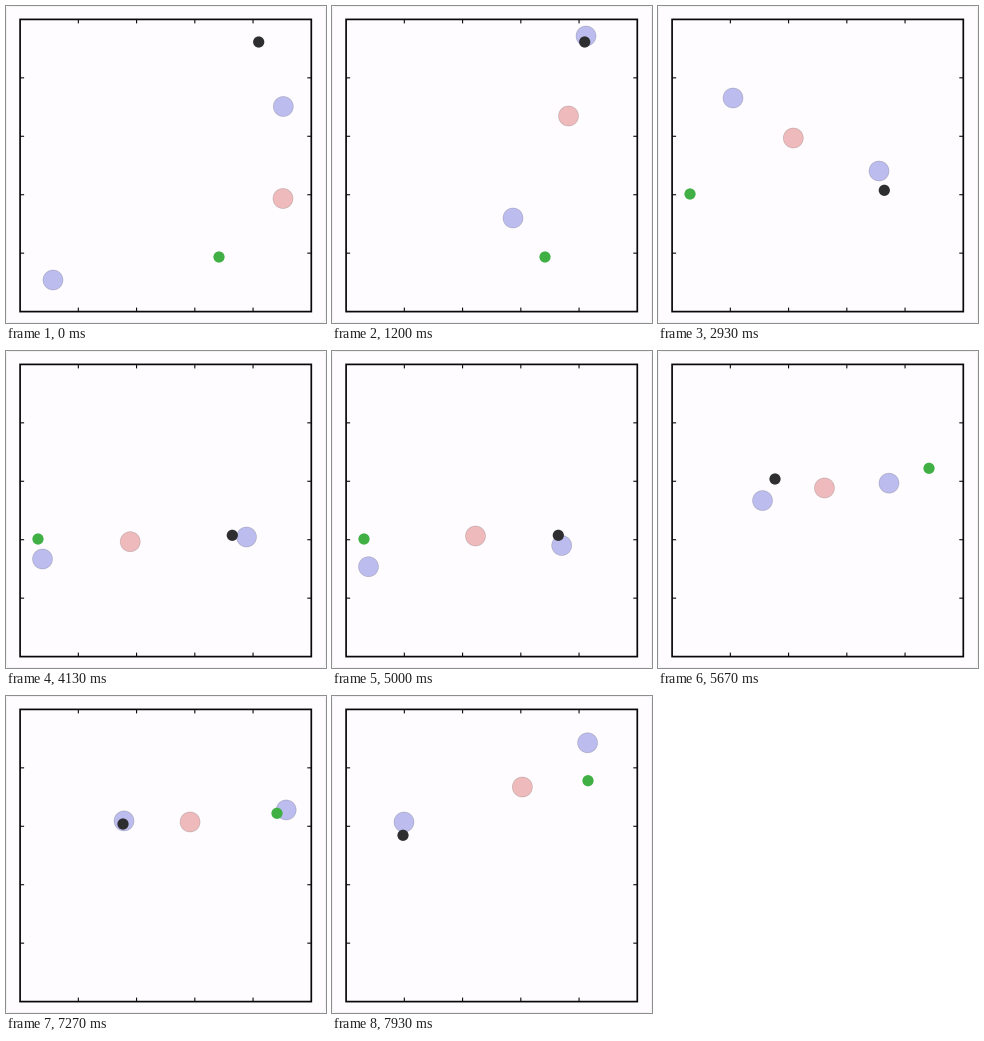
Animation, 320 px wide and 317 px high, one loop 8 s. Source, as a matplotlib script:

```python
import numpy as np
import matplotlib.pyplot as plt
from matplotlib.animation import FuncAnimation
from matplotlib.patches import Circle, FancyBboxPatch, Rectangle

W, H, DPI = 320, 317, 64
PX = 72 / DPI
FRAMES, LOOP = 120, 8000
PAPER, INK = "#fefcfe", "#080808"
BLUE, RED = (0.35, 0.37, 0.85), (0.85, 0.35, 0.35)

# Per episode: landmark places, then the poses (step: chaser, decoy chaser, red)
# that the agents spring between.
EPISODES = [
    dict(goal=(213, 251), decoy=(252.7, 36), poses={
        0: [(47, 274), (277.3, 100.5), (277, 192.5)],
        18: [(181, 212), (254, 30), (236.5, 110)],
        43: [(205, 243), (264, 43), (231, 145)]}),
    dict(goal=(32, 188), decoy=(226.3, 184.3), poses={
        43: [(75, 92), (221, 165), (135.3, 132)],
        61: [(36.5, 208), (240.5, 186), (124.2, 190.7)],
        75: [(36.5, 215.7), (229.7, 194.5), (143.5, 185)]}),
    dict(goal=(271, 117.3), decoy=(117, 128), poses={
        76: [(280.5, 99), (225, 112), (190, 106)],
        97: [(235.7, 129), (116, 146), (168.7, 134)],
        110: [(280, 114), (118, 125), (184, 126)]}),
    dict(goal=(256, 84.7), decoy=(71, 139.3), poses={
        111: [(266, 36), (57, 208), (150, 125)],
        150: [(249.2, 53.4), (81.2, 75.8), (215.1, 70.2)]}),
]


def spring(u):
    """Quick start, slight overshoot, at rest when u reaches 1."""
    return 1 - (1 - u) * np.exp(-2 * u) * np.cos(1.5 * np.pi * u)


def agent_places(poses, step):
    marks = list(poses)
    for a, b in zip(marks, marks[1:]):
        if step <= b:
            break
    p, q = np.array(poses[a]), np.array(poses[b])
    return p + (q - p) * spring((step - a) / (b - a))


fig = plt.figure(figsize=(W / DPI, H / DPI), dpi=DPI, facecolor=PAPER)
ax = fig.add_axes([0, 0, 1, 1])
ax.set(xlim=(0, W), ylim=(H, 0))
ax.axis("off")


def draw_field():
    ax.add_patch(FancyBboxPatch(
        (0.5, 0.5), W - 1, H - 1, boxstyle="round,pad=0,rounding_size=4",
        fc="none", ec="#f2f2f4", lw=PX))
    x0, x1, y0, y1 = 14.1, 305.3, 13.4, 305.6
    ax.add_patch(Rectangle((x0, y0), x1 - x0, y1 - y0, fc="none", ec=INK,
                           lw=1.7 * PX, zorder=3, snap=False))
    style = dict(color=INK, lw=1.1 * PX, zorder=3, snap=False,
                 solid_capstyle="butt")
    for f in np.arange(1, 5) / 5:
        x, y = x0 + f * (x1 - x0), y0 + f * (y1 - y0)
        for edge, d in ((y0, 4), (y1, -4)):
            ax.plot([x, x], [edge, edge + d], **style)
        for edge, d in ((x0, 4), (x1, -4)):
            ax.plot([edge, edge + d], [y, y], **style)


def disc(radius, face, edge="none", z=2):
    return ax.add_patch(Circle((0, 0), radius, fc=face, ec=edge,
                               lw=0.7 * PX, zorder=z))


draw_field()
agents = [disc(10, (*c, 0.4), (0, 0, 0, 0.18)) for c in (BLUE, BLUE, RED)]
goal = disc(5.6, "#40b045", z=4)
decoy = disc(5.6, "#2e2e30", z=4)


def update(step):
    ep = [e for e in EPISODES if min(e["poses"]) <= step][-1]
    goal.center, decoy.center = ep["goal"], ep["decoy"]
    for agent, place in zip(agents, agent_places(ep["poses"], step)):
        agent.center = tuple(place)
    return [*agents, goal, decoy]


anim = FuncAnimation(fig, update, frames=FRAMES, interval=LOOP / FRAMES,
                     repeat=True, repeat_delay=0, blit=False)
plt.show()
```
